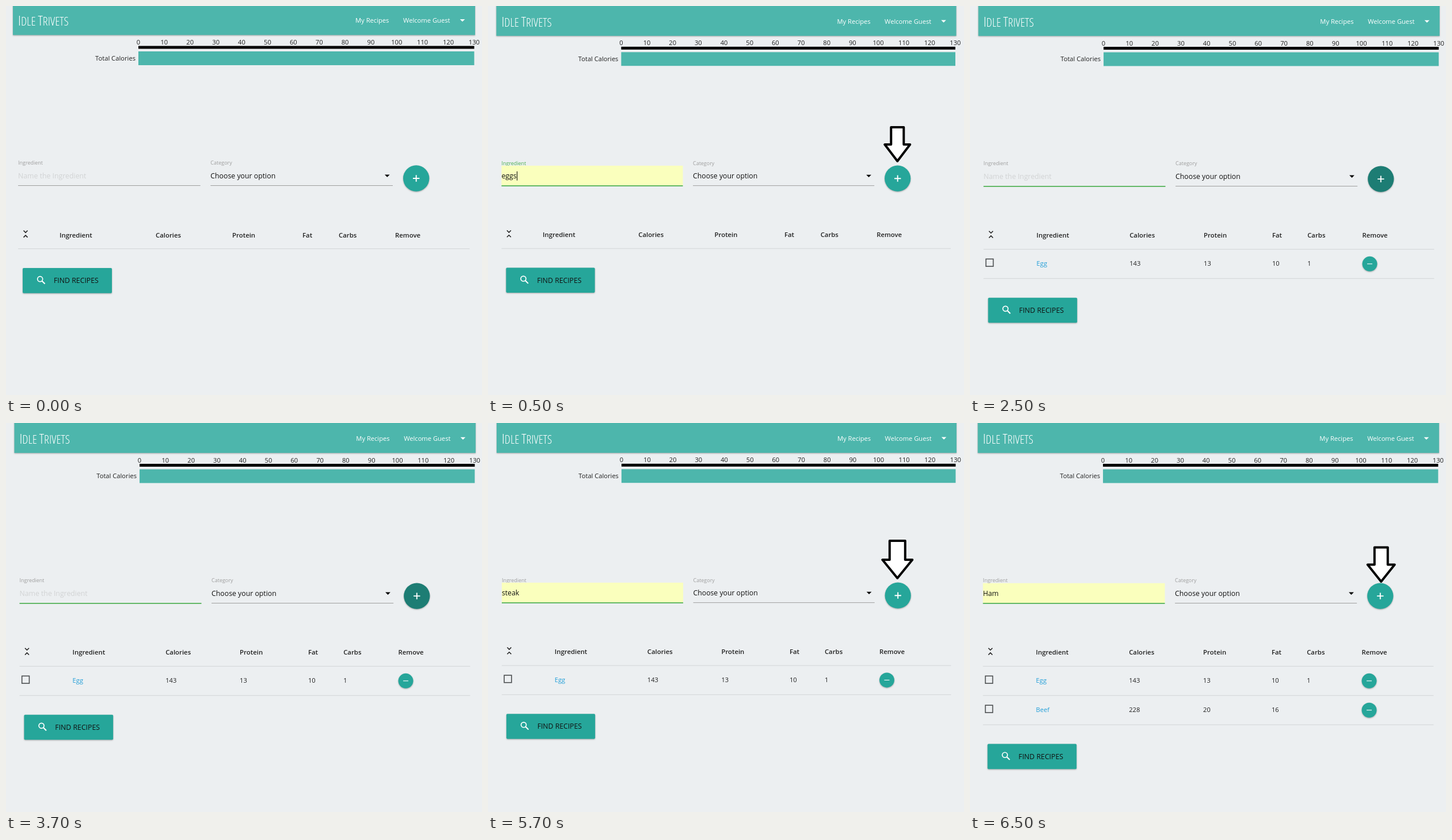
Write an HTML page that moves like this. It is 827 by 677 pixels and loops after 8 s.

```html
<!DOCTYPE html>
<html lang="en">
<head>
<meta charset="utf-8">
<title>Pantry calories</title>
<style>
  html, body { margin: 0; width: 100%; height: 100%; overflow: hidden; background: #eceff1; }
  svg { display: block; width: 827px; height: 677px; font: 11.2px "Open Sans", "Noto Sans", sans-serif; }
  text { white-space: pre; fill: #212121; }
  .brand { font: 300 21px "Open Sans", "Noto Sans", sans-serif; font-stretch: extra-condensed; fill: #fff; }
  .white { fill: #fff; }
  .field { font-size: 12.3px; fill: #111; }
  .hint { font-size: 12.3px; fill: #d1d3d4; }
  .label { font-size: 9px; fill: #9e9e9e; }
  .head { font-size: 11.4px; font-weight: 600; }
  .link { fill: #239fd8; }
  .lift { filter: drop-shadow(0 1.5px 1.2px rgba(0, 0, 0, .3)); }
</style>
</head>
<body>
<svg id="stage" viewBox="0 0 827 677"></svg>
<script>
const LOOP = 8000;
const TEAL = "#26a69a", PALE = "#4db6ac", GREEN = "#4caf50";
const WIDE_COLS = [93, 260, 393, 515, 578, 676];
const ROW_COLS = [113.3, 275.2, 404.4, 523.5, 584.8, 680.4];
const HEADS = ["Ingredient", "Calories", "Protein", "Fat", "Carbs", "Remove"];
const FOODS = [["Egg", 143, 13, 10, 1], ["Beef", 228, 20, 16, ""]];
const ROW_H = 51;

// view: left edge, scale, top shift; arrow: centre, top, shoulder, tip, half widths
const scenes = [
  { at: 0, view: [12, 1, 0], rows: 0 },
  { at: 500, view: [14.5, .995, 1.7], rows: 0, typed: "eggs", focus: true, caret: true, valid: true,
    arrow: [711.3, 211, 241, 270, 11, 22] },
  { at: 2500, view: [14.5, .998, 1.7], rows: 1, focus: true, pressed: true },
  { at: 4500, view: [15, .995, 1.7], rows: 1, typed: "steak", focus: true,
    arrow: [711.3, 205, 238, 270, 13.5, 26] },
  { at: 6500, view: [13.5, .998, 1.7], rows: 2, typed: "Ham", focus: true,
    arrow: [714.3, 216.5, 246.5, 276, 11.5, 23.5] }
];

const text = (x, y, s, cls = "", anchor = "start") =>
  `<text x="${x}" y="${y}" class="${cls}" text-anchor="${anchor}">${s}</text>`;
const rect = (x, y, w, h, fill, more = "") =>
  `<rect x="${x}" y="${y}" width="${w}" height="${h}" fill="${fill}" ${more}/>`;
const disc = (x, y, r, fill) => `<circle cx="${x}" cy="${y}" r="${r}" fill="${fill}" class="lift"/>`;
const line = (d, color, width) => `<path d="${d}" fill="none" stroke="${color}" stroke-width="${width}"/>`;
const caretDown = (x, y, w, fill) => `<path d="M${x - w} ${y}h${2 * w}l${-w} ${w}z" fill="${fill}"/>`;

function navbar() {
  return rect(12, -10, 803, 60.5, PALE, 'class="lift"') +
    text(21, 34, '<tspan font-size="24">I</tspan>DLE <tspan font-size="24">T</tspan>RIVETS', "brand") +
    text(607, 29, "My Recipes", "white") +
    text(690, 29, "Welcome Guest", "white") +
    caretDown(793, 23, 4.3, "#fff");
}

function chart() {
  let out = rect(230, 69.5, 583.5, 5, "#000") + rect(230, 79, 583.5, 24, PALE) +
    text(225, 94.5, "Total Calories", "", "end");
  for (let i = 0; i <= 13; i++) out += text(230 + i * 44.88, 67, i * 10, "", "middle");
  return out;
}

function form(s) {
  const labelFill = s.valid ? `<tspan fill="${GREEN}">Ingredient</tspan>` : "Ingredient";
  return text(21, 276.3, labelFill, "label") +
    (s.typed ? rect(21, 277.6, 316.7, 34.5, "#faffbd") : "") +
    (s.typed ? text(21, 300, s.typed, "field") : text(21, 300, "Name the Ingredient", "hint")) +
    (s.caret ? rect(47.7, 287.5, 1, 16, "#000") : "") +
    (s.focus ? rect(21, 312, 316.7, 1.7, GREEN) : rect(21, 312, 316.7, 1, "#9e9e9e")) +
    text(355.3, 276.3, "Category", "label") +
    text(355.3, 300, "Choose your option", "field") +
    caretDown(662.3, 293.4, 4.4, "#000") +
    rect(355.3, 312, 316.7, 1, "#9e9e9e") +
    disc(712.7, 300, 22.7, s.pressed ? "#1d7d74" : TEAL) +
    line("M707 300h11.4M712.7 294.3v11.4", "#fff", 1.9);
}

function foodRow(food, i) {
  const y = 448 + i * ROW_H;
  return rect(25.2, y - 8.5, 12.8, 12.8, "none", 'stroke="#4c4f51" stroke-width="1.6"') +
    food.map((v, c) => text(ROW_COLS[c], y + 3.7, v, c ? "" : "link")).join("") +
    disc(693.4, y, 13, TEAL) +
    line(`M688.9 ${y}h9`, "#fff", 1.1) +
    rect(21, y + 25, 784.5, 1, "#d2d5d7");
}

function table(n) {
  const cols = n ? ROW_COLS : WIDE_COLS;
  return line("M30.5 390.8l3.5 3.5 3.5-3.5M30.5 402.6l3.5-3.5 3.5 3.5", "#212121", 1.6) +
    HEADS.map((h, c) => text(cols[c], 402.5, h, "head")).join("") +
    rect(21, 422, 784.5, 1, "#d2d5d7") +
    FOODS.slice(0, n).map(foodRow).join("");
}

function findButton(n) {
  return `<g transform="translate(0 ${n * ROW_H})">` +
    rect(29, 456, 155, 43.7, TEAL, 'rx="1.8" class="lift"') +
    `<circle cx="59.2" cy="475.2" r="4.5" fill="none" stroke="#fff" stroke-width="1.7"/>` +
    line("M62.4 478.4l5.2 5.2", "#fff", 2.1) +
    text(83, 482.3, "FIND RECIPES", "field white") + "</g>";
}

function arrow([cx, top, shoulder, tip, shaft, head]) {
  return `<path d="M${cx - shaft} ${top}H${cx + shaft}V${shoulder}H${cx + head}L${cx} ${tip}` +
    `L${cx - head} ${shoulder}H${cx - shaft}Z" fill="#fff" stroke="#000" stroke-width="4" stroke-linejoin="round"/>`;
}

function draw(s) {
  const [left, k, top] = s.view;
  return `<g transform="matrix(${k} 0 0 ${k} ${left - 12 * k} ${top})">` +
    navbar() + chart() + form(s) + table(s.rows) + findButton(s.rows) + "</g>" +
    (s.arrow ? arrow(s.arrow) : "");
}

const stage = document.getElementById("stage");
const start = performance.now();
let shown;

function update(now) {
  const t = Math.max(0, now - start) % LOOP;
  const scene = scenes.filter(s => s.at <= t).pop();
  if (scene !== shown) {
    stage.innerHTML = draw(scene);
    shown = scene;
  }
  requestAnimationFrame(update);
}
update(start);
</script>
</body>
</html>
```
